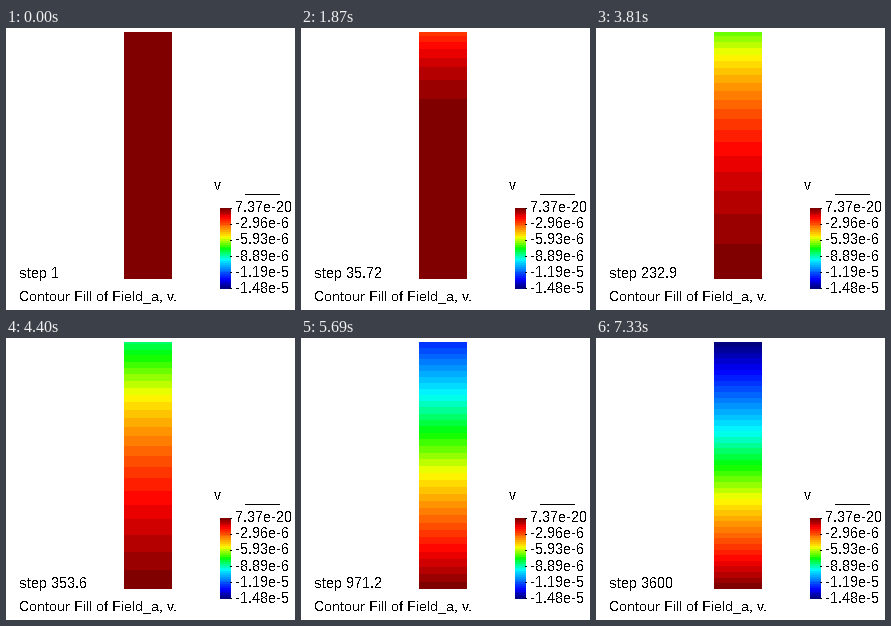
A matplotlib script for the animation above (7.84 s loop, 289 by 282 pixels).

```python
import numpy as np
import matplotlib.pyplot as plt
from matplotlib.animation import FuncAnimation
from matplotlib.colors import LinearSegmentedColormap

W, H, DPI = 289, 282, 64
LOOP, TICK = 7840, 20
BANDS = 44
TOP, BOTTOM = 4, 251
V_MAX, V_MIN = 7.37e-20, -1.4817e-5

plt.rcParams.update({
    "font.family": "Liberation Sans",
    "text.antialiased": False,
    "text.hinting": "native",
    "text.hinting_factor": 1,
})

# Pace of playback: increments reached at a few moments (ms)
KEY_MS = [580, 1870, 2730, 3810, 4960, 5690, 7330]
KEY_INC = [2, 21, 34, 52, 69, 80, 107]

CMAP = LinearSegmentedColormap.from_list("contour", list(zip(
    [0, .11, .36, .5, .64, .89, 1],
    ["#800000", "red", "yellow", "lime", "cyan", "blue", "#000080"])), N=BANDS)

DEPTH = (np.arange(BOTTOM - TOP) + .5) / (BOTTOM - TOP)
MODES = np.pi * (np.arange(80) + .5)
SHAPES = 2 / MODES ** 2 * np.cos(np.outer(DEPTH, MODES))
RATE = 6.84e-4


def step_at(ms):
    """Simulated time; its increments grow by 5 % up to the end."""
    n = int(np.interp(ms, KEY_MS, KEY_INC, left=1) + 1e-6)
    return min((1.05 ** n - 1) / .05, 3600)


def settlement(step):
    """One-dimensional consolidation of a column drained at its top."""
    return 1 - DEPTH - SHAPES @ np.exp(-MODES ** 2 * RATE * (step - .5))


def pixels(values, width):
    return np.repeat(CMAP(values)[:, None, :3], width, axis=1)


fig = plt.figure(figsize=(W / DPI, H / DPI), dpi=DPI, facecolor="white")


def place(image, x, y):
    return fig.figimage(image, x, H - y - len(image), origin="upper")


def label(x, y, text, px=15):
    return fig.text(x / W, 1 - y / H, text, size=px * 72 / DPI,
                    color="black", va="baseline")


def bar(x, y, width):
    place(np.zeros((1, width, 3)), x, y)


column = place(pixels(settlement(1), 48), 118, TOP)
counter = label(13, 250, "step 1")
label(13, 272, "Contour Fill of Field_a, v.", 14)

label(208, 162, "v")
bar(239, 166, 35)
place(pixels((np.arange(81) + .5) / 81, 11), 214, 180)
for i in range(6):
    value = V_MAX + V_MIN * i / 5
    label(229, round(184 + 16.2 * i), f"{value:.2e}".replace("e-0", "e-"))
    bar(224, round(180 + 16.1 * i), 2)


def update(i):
    step = step_at((i + .5) * TICK)
    column.set_data(pixels(settlement(step), 48))
    counter.set_text(f"step {step:.4g}")
    return column, counter


anim = FuncAnimation(fig, update, frames=LOOP // TICK, interval=TICK,
                     repeat=True, repeat_delay=0, blit=False)
plt.show()
```
